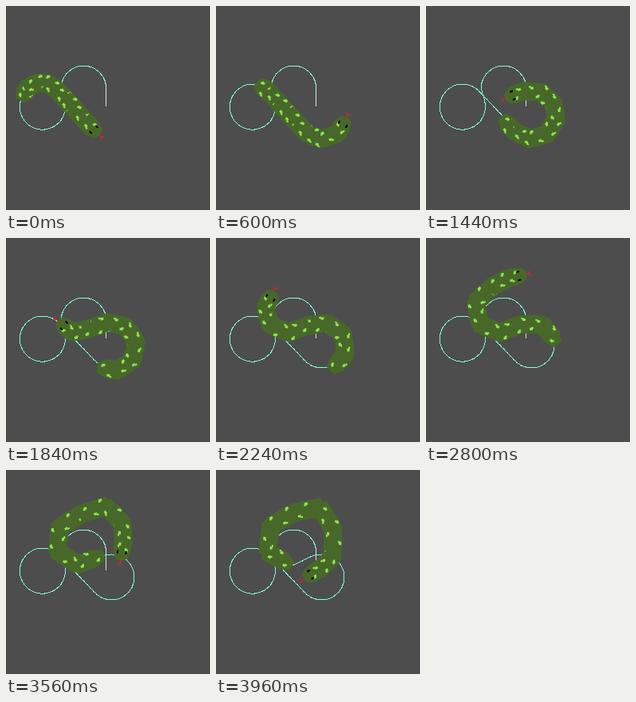
An HTML page with a canvas for the animation above (4 s loop, 256x256 px).

```html
<!DOCTYPE html>
<html>
<head>
<meta charset="utf-8">
<style>
  html, body { margin: 0; width: 100%; height: 100%; overflow: hidden; background: #4d4d4d; }
  canvas { display: block; width: 256px; height: 256px; }
</style>
</head>
<body>
<canvas id="stage" width="256" height="256"></canvas>
<script>
const ctx = document.getElementById('stage').getContext('2d');
const LOOP = 4000, STEP = 40;
const GROUND = '#4d4d4d', SKIN = '#48682a', SPOT = '#90e650', TRAIL = '#7fffd4', TRAIL_START = '#cfe8e0';
const PIECES = 6, HALF_WIDTH = 11.5, HEAD_LENGTH = 24, NECK_LENGTH = 22;

function makePath(d) {
  const path = document.createElementNS('http://www.w3.org/2000/svg', 'path');
  path.setAttribute('d', d);
  return path;
}

// Centre line of the body over the whole loop.
const route = makePath(
  'M20 115 A25 25 0 0 1 62 103 L111 157 A30.5 30.5 0 1 0 132 106 H124 L92 119 ' +
  'C70 119 62 106 62 86 C62 78 66 71 74 66 L108 48 C120 41 147 44 147 75 V100 Q147 115 136 121 L94 146');

// Line left behind by the tail.
const trail = makePath(
  'M125.5 125 V100 A28.3 28.3 0 0 0 69.3 100 C69.3 110 74.3 114 74.3 126.5 ' +
  'A28.5 28.5 0 1 1 65.8 106.3 L112 154.3 A28.5 28.5 0 1 0 132 106 C119 106 110 114 100 118 S90 120 84 120');

// One-pixel dots along the trail, each with its distance from the start.
const trailDots = [];
for (let d = 0; d < trail.getTotalLength(); d += 0.8) {
  const { x, y } = trail.getPointAtLength(d);
  trailDots.push({ d, x: Math.floor(x), y: Math.floor(y) });
}

// Repeatable pseudo-random number from 0 to 1.
function random(seed) {
  const x = Math.sin(seed * 12.9898) * 43758.5453;
  return x - Math.floor(x);
}

// Fills an outline of [x, halfWidth] pairs mirrored about the x axis.
function fillMirrored(outline) {
  ctx.beginPath();
  outline.forEach(([x, y]) => ctx.lineTo(x, y));
  outline.reverse().forEach(([x, y]) => ctx.lineTo(x, -y));
  ctx.fillStyle = SKIN;
  ctx.fill();
}

// Spots alternate between the two sides of the piece.
function drawSpots(seed, length, count = 3) {
  ctx.fillStyle = SPOT;
  for (let k = 0; k < count; k++) {
    const side = (k + seed) % 2 ? 1 : -1;
    const x = (k + 0.5) / count * length;
    const y = side * (3.5 + 5.5 * random(seed * 7 + k));
    ctx.fillRect(x - 2, y - 2, 4, 3);
    ctx.fillRect(x - 1 + side * 2, y, 3, 2);
  }
}

// Runs draw(length) in a frame whose x axis points from one route position to the next.
function alongRoute(from, to, draw) {
  const a = route.getPointAtLength(from), b = route.getPointAtLength(to);
  ctx.save();
  ctx.translate(a.x, a.y);
  ctx.rotate(Math.atan2(b.y - a.y, b.x - a.x));
  draw(Math.hypot(b.x - a.x, b.y - a.y));
  ctx.restore();
}

function drawPiece(from, to, seed) {
  const rear = seed === 0 ? 6 : HALF_WIDTH - 1;
  alongRoute(from, to, length => {
    fillMirrored([[-4, rear], [length * 0.3, HALF_WIDTH], [length + 2, HALF_WIDTH], [length + 4, HALF_WIDTH - 2]]);
    drawSpots(seed, length);
  });
}

function drawHead(from, to) {
  alongRoute(from, to, length => {
    fillMirrored([[-4, 10], [0, HALF_WIDTH], [length - 11, 11], [length - 3, 8], [length, 4]]);
    drawSpots(PIECES + 1, length - 9, 2);
    ctx.fillStyle = '#000';
    for (const side of [-1, 1]) ctx.fillRect(length - 12, side * 5.3 - 1, 4, 2);

    ctx.beginPath();
    ctx.moveTo(length - 1, 0);
    ctx.lineTo(length + 3, 0);
    for (const side of [-1, 1]) {
      ctx.moveTo(length + 3, 0);
      ctx.lineTo(length + 6, side * 3);
    }
    ctx.strokeStyle = '#d32430';
    ctx.lineWidth = 1.3;
    ctx.stroke();
  });
}

function drawTrail(end) {
  for (const { d, x, y } of trailDots) {
    if (d > end) break;
    ctx.fillStyle = d < 28 ? TRAIL_START : TRAIL;
    ctx.fillRect(x, y, 1, 1);
  }
}

function drawScene(t) {
  ctx.fillStyle = GROUND;
  ctx.fillRect(0, 0, 256, 256);
  drawTrail(245 + 0.071 * t);

  // The head outruns the tail, so the body lengthens over the loop.
  const tail = 0.0735 * t;
  const tip = 134 + 0.1035 * t;
  const head = tip - HEAD_LENGTH, neck = head - NECK_LENGTH;
  const span = (neck - tail) / PIECES;
  for (let i = 0; i < PIECES; i++) drawPiece(tail + i * span, tail + (i + 1) * span, i);
  drawPiece(neck, head, PIECES);
  drawHead(head, tip);
}

const start = performance.now();
function tick() {
  const elapsed = Math.max(0, performance.now() - start) % LOOP;
  drawScene(Math.floor(elapsed / STEP) * STEP);
  requestAnimationFrame(tick);
}
tick();
</script>
</body>
</html>
```
